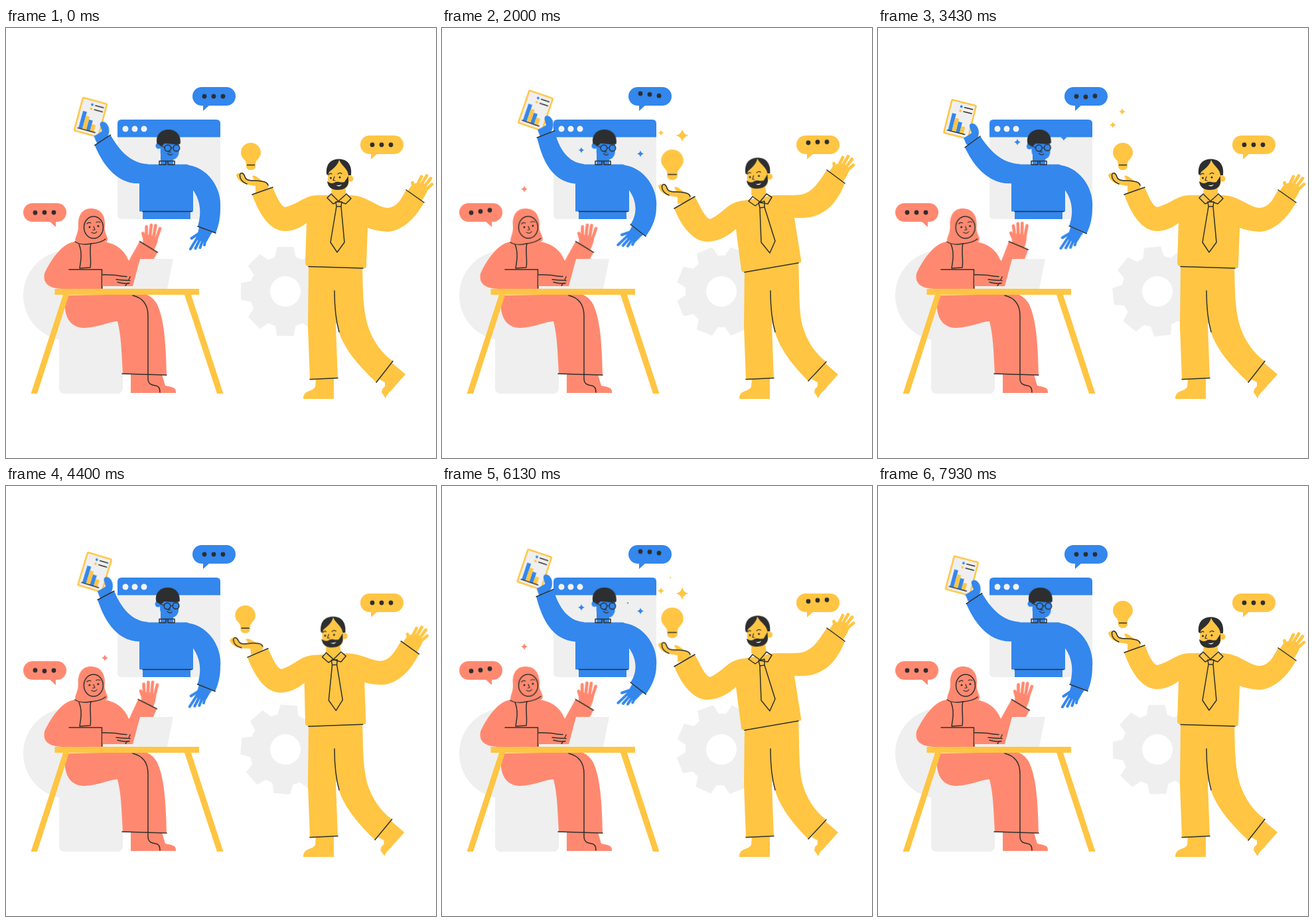
An HTML page that plays this animation: 648 by 648 pixels, repeating every 8010 ms.

```html
<!DOCTYPE html>
<html lang="en">
<head>
<meta charset="utf-8">
<title>Team chat</title>
<style>
  :root { --loop: 4005ms; --half: 2002.5ms; --sine: cubic-bezier(.37, 0, .63, 1); }
  html, body { margin: 0; width: 100%; height: 100%; overflow: hidden; background: #fff; }
  svg { display: block; width: 100vw; height: 100vh; }

  .blue { color: #3387ed; fill: currentColor; }
  .coral { color: #ff8970; fill: currentColor; }
  .gold { color: #ffc543; fill: currentColor; }
  .grey { fill: #efefef; }
  .white { fill: #fff; }
  .dark { fill: #2d2e2f; }
  .line { fill: none; stroke: #30302c; stroke-width: 1.5; stroke-linecap: round; stroke-linejoin: round; }
  .fine { stroke-width: 1.2; }
  .fingers { fill: none; stroke: currentColor; stroke-width: 4.7; stroke-linecap: round; stroke-linejoin: round; }

  /* Moving parts carry their two poses in --a/--b (outline) or --ta/--tb (transform). */
  .swing { animation: swing var(--half) var(--sine) infinite alternate; }
  .quick { animation-duration: calc(var(--half) / 2); }
  .reach { animation-delay: -570ms; }
  path.swing, path.lean { d: var(--a); }
  .lean { animation: lean var(--loop) var(--sine) infinite; }
  .late { animation-delay: 100ms; }
  .gear { animation: spin var(--loop) linear infinite; }
  .palm { transform-origin: 386px 245px; animation: palm var(--loop) var(--sine) infinite; }
  .bulb { transform-origin: 369px 213px; animation: bulb var(--loop) var(--sine) infinite; }
  .dots circle { animation: bob var(--loop) infinite calc(var(--t) + var(--i) * 250ms); }
  .dots :nth-child(1) { --i: 0; }
  .dots :nth-child(2) { --i: 1; }
  .dots :nth-child(3) { --i: 2; }
  .spark { animation: spark var(--loop) linear var(--t) infinite both; }

  @keyframes swing {
    from { d: var(--a); transform: var(--ta); }
    to { d: var(--b); transform: var(--tb); }
  }
  @keyframes lean {
    0%, 84%, 100% { d: var(--a); transform: var(--ta); }
    25%, 55% { d: var(--b); transform: var(--tb); }
  }
  @keyframes spin { to { transform: rotate(45deg); } }
  @keyframes palm {
    0%, 50%, 85%, 100% { transform: rotate(0deg); }
    18%, 31% { transform: rotate(-13deg); }
    64%, 71% { transform: rotate(-5deg); }
  }
  @keyframes bulb {
    0%, 84%, 100% { transform: translate(0, 0) scale(1); }
    25%, 31% { transform: translate(-25px, 23px) scale(1.06); }
    50%, 57.5% { transform: translate(-22px, 15px) scale(1.12); }
  }
  @keyframes bob {
    0%, 62%, 100% { transform: translateY(0); }
    5%, 55% { transform: translateY(.8px); }
    10% { transform: translateY(0); animation-timing-function: cubic-bezier(.39, .575, .565, 1); }
    30% { transform: translateY(-4.4px); animation-timing-function: cubic-bezier(.47, 0, .745, .715); }
    50% { transform: translateY(0); }
  }
  @keyframes spark {
    0% { translate: 0 0; scale: 0; }
    6%, 42% { scale: 1; }
    47%, 100% { translate: 0 var(--rise, 0px); scale: 0; }
  }
</style>
</head>
<body>
<svg viewBox="0 0 648 648">
  <defs>
    <path id="tooth" d="M-16 -50L-12.5 -67H12.5L16 -50Z"/>
    <g id="teeth"><use href="#tooth"/><use href="#tooth" transform="rotate(90)"/><use href="#tooth" transform="rotate(180)"/><use href="#tooth" transform="rotate(270)"/></g>
    <path id="star" d="M0 -5Q.9 -.9 5 0Q.9 .9 0 5Q-.9 .9 -5 0Q-.9 -.9 0 -5Z"/>
    <g id="bubble"><rect width="65" height="28" rx="14"/><path d="M16 26V36L27 26Z"/></g>
  </defs>

  <!-- gear -->
  <g transform="translate(421 397)" class="grey">
    <g class="gear"><circle r="54"/><use href="#teeth"/><use href="#teeth" transform="rotate(45)"/></g>
    <circle r="23" class="white"/>
  </g>

  <!-- chair -->
  <g class="grey"><circle cx="94" cy="403" r="68"/><rect x="80" y="420" width="96" height="131" rx="8"/></g>

  <!-- window -->
  <rect x="168" y="138" width="155" height="150" rx="6" class="grey"/>
  <path class="blue" d="M168 164.500V144Q168 138 174 138H317Q323 138 323 144V164.500Z"/>
  <g fill="#f3f3f3"><circle cx="180" cy="152" r="4.500"/><circle cx="194" cy="152" r="4.500"/><circle cx="208" cy="152" r="4.500"/></g>

  <!-- caller in the window -->
  <g class="blue">
    <g transform="translate(210 186)"><use href="#star" class="spark" style="--t:1780ms;--rise:-16px"/></g>
    <g transform="translate(299 195)"><use href="#star" class="spark" style="--t:1350ms;--rise:-16px"/></g>
    <g transform="translate(280 177)"><use href="#star" class="spark" style="--t:2040ms;--rise:-16px"/></g>

    <g class="swing reach" style="transform-origin:124px 138px;--ta:translate(0px,0px) rotate(0deg);--tb:translate(21.5px,-16px) rotate(6deg)">
      <g transform="translate(123.500 137.500) rotate(14)">
        <rect x="-20" y="-27" width="40" height="54" rx="3" class="gold"/>
        <rect x="-17.500" y="-24.500" width="35" height="49" rx="1" class="grey"/>
        <path d="M-13.500 -6.500h6V20.500h-6zM-1.500 4h6V20.500h-6z"/>
        <path class="gold" d="M-7.500 -.5h6V20.500h-6zM4.500 9.500h6V20.500h-6z"/>
        <circle cx="-2.500" cy="-19" r="1.900"/><circle cx="-2.500" cy="-12.500" r="1.900" class="gold"/>
        <path class="line" d="M2.500 -19H15M2.500 -12.500H15M-14.500 20.500H12.500"/>
      </g>
      <path d="M133 175L129 166L137 161L141 158L138 149C137 143 144 142 148 147C153 152 153 162 149 168L151 173L141 182Z"/>
    </g>
    <path class="swing reach" style="--a:path('M131 180C142 204 166 238 204 234L214 205C190 204 172 190 154 163Z');--b:path('M146 162C151 186 160 232 204 235L214 205C190 203 177 180 173 153Z')"/>
    <path class="line swing reach" style="--a:path('M131 180L154 163');--b:path('M146 162L173 153')"/>

    <g class="swing" style="transform-origin:302px 304px;--ta:translate(0px,0px) rotate(0deg);--tb:translate(-6px,1px) rotate(15deg)">
      <path d="M291 300L311 308C306 314 305 319 301 324L288 319C287 312 290 307 291 300Z"/>
      <path class="fingers" style="stroke-width:4" d="M290 310L279.500 317M289 315L278 333M292 319L285.500 332M296 321L292.500 331M300 321L299 327"/>
    </g>
    <path class="swing" style="--a:path('M270 206C304 208 326 242 323 272C323 288 320 299 316 309L289 299C294 282 295 262 281 243Z');--b:path('M270 206C304 208 326 242 323 270C323 286 317 301 307 314L284 296C294 281 295 262 281 243Z')"/>
    <path class="line swing" style="--a:path('M289 299L316 309');--b:path('M284 296L307 314')"/>

    <path d="M201 276.500V216C201 208 206 206 214 205.500L272 205.500C280 206 284 225 282 243V276.500H278V288H206V276.500Z"/>
    <path class="line" d="M206 276.500H280"/>

    <path d="M233 185H252V207H233Z"/>
    <g class="swing quick" style="transform-origin:243px 205px;--ta:rotate(2deg);--tb:rotate(-3.500deg)">
      <path d="M232 166H260V187C260 194 254 199 247 199C239 199 232 193 232 185Z"/>
      <circle cx="229" cy="178" r="4.500"/>
      <path class="dark" d="M226.500 175C223 162 232 153 243.500 153C256 153 263 162 261.500 174C254 176 246 174 238 174L234 178Z"/>
      <path class="line fine" d="M231 177L238 180M247.500 180.500H251M246 184L245 187L248 187M243 189Q247 193 250 190"/>
      <circle cx="243" cy="181" r="4.800" class="line"/><circle cx="256" cy="180.500" r="4.800" class="line"/>
    </g>
    <path class="line" d="M231 200.500H241V206H231ZM244 200.500H254V206H244ZM241 200.500H244"/>
  </g>

  <!-- woman at the desk -->
  <g class="coral">
    <g transform="translate(124 248)"><use href="#star" class="spark" style="--t:1150ms;--rise:-11.500px"/></g>
    <g transform="translate(149 261)"><use href="#star" class="spark" style="--t:50ms;--rise:-11.500px"/></g>

    <path d="M90 403C85 430 94 452 118 452C140 451 156 442 168 442C174 465 174 490 176 521L242 523C241 480 239 438 227 415C222 407 216 403 210 401Z"/>
    <path d="M188 521V550H256C257 541 249 541 240 539L235 522Z"/>
    <path class="line" d="M191 403C208 407 214 418 214 434V528C214 538 221 538 226 539C231 540 232 544 232 549M175 521L242 523"/>

    <g class="swing quick" style="transform-origin:200px 350px;--ta:rotate(13deg);--tb:rotate(-1deg)">
      <path d="M195 322L225 332L216 364L194 376L184 362L187 349Z"/>
      <path d="M200 324L199 314Q202 309 209 309L220 311Q223 315 219 330Z"/>
      <path class="fingers" d="M202 318L197 309M203 312L200 298M208.500 312L206.500 294M214 312L213 293M218.500 314L220.500 296"/>
      <path class="line" d="M195 322L225 332"/>
    </g>
    <path d="M105 322C85 323 67 350 58 370C55 386 66 393 88 393H196L200 354L184.500 350C178 334 166 325 148 322Z"/>
    <path class="line" d="M187 375L180 389"/>

    <g class="swing" style="transform-origin:128px 324px;--ta:translate(0px,0px) rotate(0deg);--tb:translate(-1px,0px) rotate(-2.500deg)">
      <path d="M128 272C114 272 108 284 109 299C109 311 102 317 105 323C115 330 140 326 152 322C156 315 147 310 149 298C150 282 142 272 128 272Z"/>
      <ellipse cx="132" cy="300.500" rx="14.500" ry="16.500" class="line"/>
      <circle cx="126" cy="300" r="1.500" class="dark"/><circle cx="139" cy="298.500" r="1.500" class="dark"/>
      <path class="line fine" d="M122 295Q125 292 128 294M136 293Q139 291 142 293M132 299L134 304L131 304.500M129 308Q134 311 137 307"/>
      <path class="line" d="M104 322Q113 328 128 325Q143 324 150 318"/>
    </g>
    <path class="line" d="M110 326C115 338 113 350 111 362L127 361C129 348 125 334 128 325"/>
    <path class="line" d="M95 364H144.500V392"/>
  </g>
  <path class="grey" d="M202 348H252L243 393H146V389H191Z"/>
  <path class="coral" d="M145 372C160 371 172 374 183 374.500Q188 376 184 378.500L187 382Q187 386 180 385L168 384L160 388H145Z"/>
  <path class="line" d="M145 372C160 371 172 374 182 374.500M166 379Q176 380 187 380.500M168 383Q178 386 186 384.500"/>
  <path class="gold" d="M73.500 393H291V402H279L327.500 551H318L269 402H95L47 551H37.500L86 402H73.500Z"/>

  <!-- man with the idea -->
  <g class="gold">
    <path d="M456 358L455 450L458 530L500 528L497 448L502 420L500 358Z"/>
    <path class="lean" style="--a:path('M495 355C494 400 495 430 502 459C512 488 535 512 558 534L583 502C566 490 553 472 545 448C537 420 538 390 537 355Z');--b:path('M495 355C494 400 495 430 502 459C510 486 532 512 552 532L579 503C562 490 550 472 543 448C537 420 539 390 537 350Z')"/>
    <path d="M467 528L466 541C461 549 448 545 448 559H494V528Z"/>
    <g class="lean" style="--ta:translate(0px,0px);--tb:translate(-5px,0px)">
      <path d="M581 504L602 522L585 541C581 547 575 549 572 558L566 549L567 544L571 540V534L562 529Z"/>
    </g>
    <path class="line" d="M458 529.500L500 527.500M495 396C495 422 497 440 502 458"/>
    <path class="line lean" style="--a:path('M583 502L558 534');--b:path('M579 503L552 532')"/>

    <g class="lean" style="--ta:translate(0px,0px);--tb:translate(-22px,-29px)">
      <path d="M605 246L612 236Q620 231 630 235L636 242Q634 250 626 261Z"/>
      <path class="fingers" d="M615 243L612.500 233M619 238L626 224M624 239L634 222.500M629 241L640 226.500M631 245L642 235.500"/>
    </g>
    <g class="lean" style="--ta:translate(0px,0px);--tb:translate(-21px,17px)">
      <g class="palm">
        <path d="M347 222Q349 217 354 219Q358 216 360 224C361 230 366 230 374 229L371 223Q375 221 380 226L388 231Q396 232 396 238L392 246L376 248V238C366 236 352 236 347 222Z"/>
        <path class="line" d="M363 235C356 232 352 227 352.500 221C354 217 358 218 360 224C362 232 372 229 385 231Q394 232 395 237"/>
      </g>
    </g>

    <path class="lean" style="--a:path('M371 251C383 285 400 306 420 306C435 306 444 300 453 294L451 354C451 357 452 358 455 359L540 362C543 362 543 360 543 358L545 301C550 303 560 306 575 307C595 306 615 290 630 263L603 244C595 258 590 270 575 271C560 271 545 253 520 252L470 252C450 252 440 266 420 270C414 268 408 255 402 240Z');--b:path('M350 272C362 302 380 322 400 322C420 321 432 312 443 303L451 364C451 367 453 368 456 368L538 354C541 354 542 352 541 349L531 286C537 286 545 287 555 285C580 280 596 262 607 234L580 214C570 228 562 243 548 249C540 253 520 252 500 252L455 260C430 262 425 279 404 288C396 286 390 270 381 254Z')"/>
    <path class="line lean" style="--a:path('M371 251L402 240M603 244L630 263M456 359.500L538 362');--b:path('M350 272L381 254M580 214L607 234M456 368L537 354')"/>

    <g class="lean" style="transform-origin:501px 252px;--ta:translate(0px,0px) rotate(0deg);--tb:translate(-24px,-2px) rotate(-3deg)">
      <path d="M491 236H511L513 253L501 263L490 253Z"/>
      <path d="M486 208L500 199L517 208V229C517 240 510 245 500 245C491 245 486 240 485 229Z"/>
      <circle cx="519" cy="227" r="4.500"/>
      <path class="dark" d="M483 220C482 204 490 197.500 502 197.500C514 197.500 522 206 520 222L516 222C515 212 507 209 502 199C499 209 491 213 487 217L485 222Z"/>
      <path class="dark" d="M484 231C488 234 491 235 495 233C500 230 505 234 510 232L516 223V233C515 241 508 244 499 244C490 244 485 239 484 231Z"/>
      <path class="white" d="M497 236.500Q502 238 506 235.500Q503 241 497 236.500Z"/>
      <circle cx="489.500" cy="226" r="1.500" class="dark"/><circle cx="503" cy="225" r="1.500" class="dark"/>
      <path class="line fine" d="M486 221Q489 218 491 220M500 220Q503 217 506 219.500M495 224L493 229.500L496 230"/>
    </g>
    <path class="line lean" style="--a:path('M490 250L484 256L493 265L501 261L512 265L520 257L513 250L501 261L490 250M497 262L506 262L505 269L498 269ZM498 269L489 323L499 338L510 323L505 269');--b:path('M468 254L462 261L472 268L479 263L491 265L497 255L489 250L479 262L468 254M477 263L486 261L486 270L479 271ZM479 271L481 323L494 339L502 321L486 270')"/>

    <g class="bulb">
      <path d="M369 173C378 173 384 180 384 188C384 196 377 198 376 204V209Q375 214 369 214Q363 214 362 209V204C361 198 354 196 354 188C354 180 360 173 369 173Z"/>
      <path class="line" d="M363.500 206.500H374.500"/>
    </g>
    <g class="lean late" style="--ta:translate(0px,0px);--tb:translate(-24px,12px)">
      <g transform="translate(354 146)"><use href="#star" class="spark" style="--t:1790ms"/></g>
      <g transform="translate(386 150) scale(1.900)"><use href="#star" class="spark" style="--t:1400ms"/></g>
      <g transform="translate(368 126)"><use href="#star" class="spark" style="--t:2040ms"/></g>
    </g>
  </g>

  <!-- speech bubbles -->
  <use href="#bubble" class="blue" x="281" y="89"/>
  <use href="#bubble" class="gold" x="534" y="162"/>
  <use href="#bubble" class="coral" transform="translate(91 264) scale(-1 1)"/>
  <g class="dark">
    <g class="dots" style="--t:1000ms"><circle cx="299" cy="103" r="3.400"/><circle cx="313" cy="103" r="3.400"/><circle cx="327" cy="103" r="3.400"/></g>
    <g class="dots" style="--t:400ms"><circle cx="552" cy="176" r="3.400"/><circle cx="566" cy="176" r="3.400"/><circle cx="580" cy="176" r="3.400"/></g>
    <g class="dots" style="--t:-50ms"><circle cx="44" cy="278" r="3.400"/><circle cx="58" cy="278" r="3.400"/><circle cx="72" cy="278" r="3.400"/></g>
  </g>
</svg>
</body>
</html>
```
